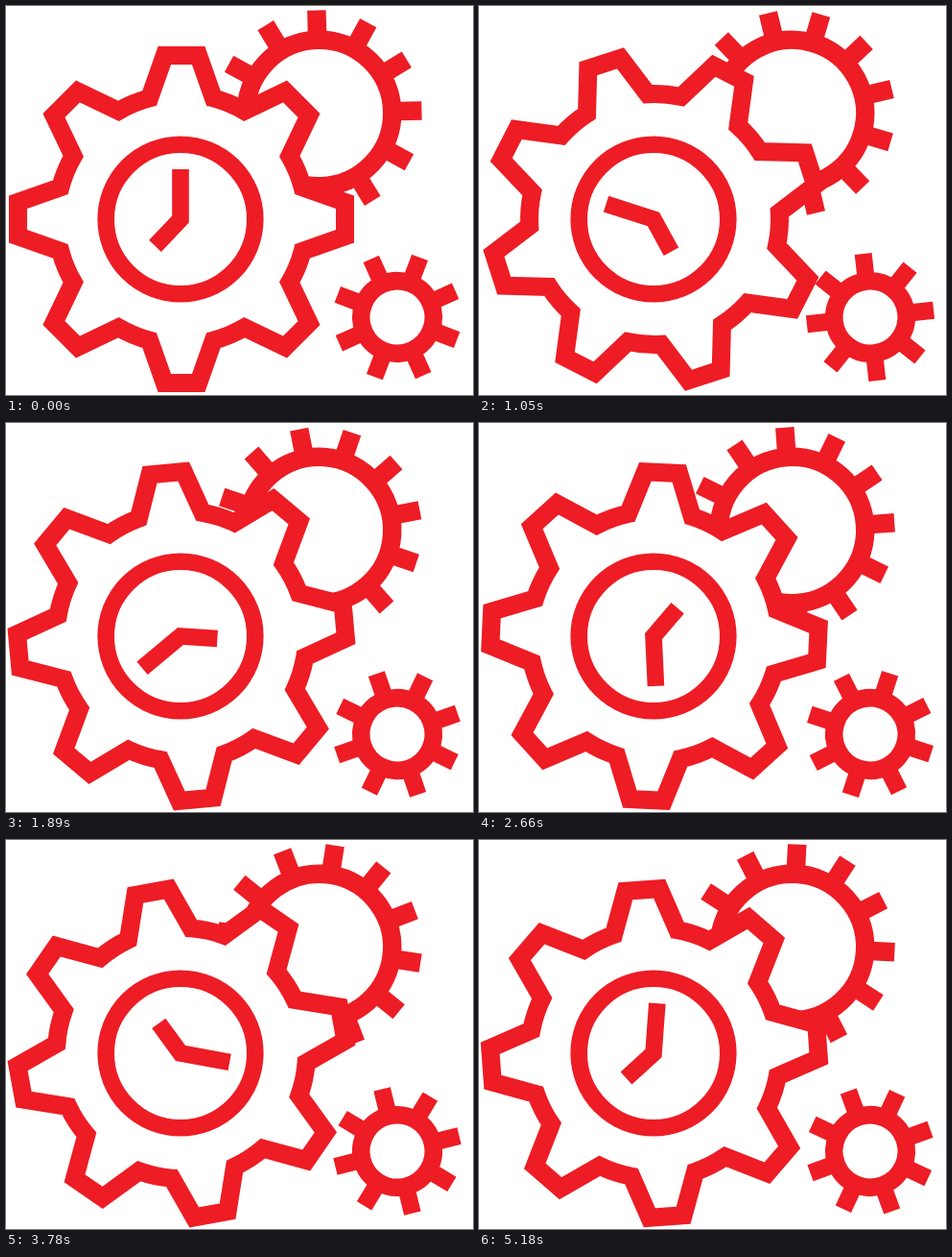
Write an HTML page that moves like this. It is 487 px wide and 405 px high and loops after 5.25 s.

```html
<!DOCTYPE html>
<html lang="en">
<head>
<meta charset="utf-8">
<title>Clockwork gears</title>
<style>
  html, body { margin: 0; width: 100%; height: 100%; overflow: hidden; background: #fff; }
  svg { display: block; width: 100%; height: 100%; }
</style>
</head>
<body>
<svg id="stage" viewBox="0 0 487 405" fill="none" stroke="#ee1c24" stroke-miterlimit="10"></svg>
<script>
// Slightly more than 360 / STEPS, so the last step of the loop is a little shorter
const STEP = 70, STEPS = 75, TURN = 4.808;
const stage = document.getElementById('stage');

function add(parent, tag, attrs) {
  const node = document.createElementNS('http://www.w3.org/2000/svg', tag);
  for (const name in attrs) node.setAttribute(name, attrs[name]);
  return parent.appendChild(node);
}

// Clockwise from twelve o'clock, in degrees
function polar(radius, angle) {
  const a = angle * Math.PI / 180;
  return [radius * Math.sin(a), -radius * Math.cos(a)].map(v => v.toFixed(2)).join(' ');
}

const spinners = [];
function spinner(x, y, direction, base = 0) {
  const node = add(stage, 'g', {});
  spinners.push({ node, x, y, direction, base });
  return node;
}

function cog(x, y, base, teeth, { inner, outer, tip, width }) {
  const group = spinner(x, y, -1, base);
  add(group, 'circle', { r: (inner + outer) / 2, 'stroke-width': outer - inner });
  let d = '';
  for (let i = 0; i < teeth; i++) {
    const angle = i * 360 / teeth;
    d += `M${polar(outer - 4, angle)}L${polar(tip, angle)}`;
  }
  add(group, 'path', { d, 'stroke-width': width });
}

function bigGear(x, y) {
  const teeth = 8, pitch = 360 / teeth;
  const tipRadius = Math.hypot(17.7, 170.5);
  const tipAngle = Math.atan2(17.7, 170.5) * 180 / Math.PI;
  const rootRadius = 130.5, rootAngle = 14.8;
  let d = '';
  for (let i = 0; i < teeth; i++) {
    const a = i * pitch;
    d += `${i ? 'L' : 'M'}${polar(tipRadius, a - tipAngle)}L${polar(tipRadius, a + tipAngle)}`
      + `L${polar(rootRadius, a + rootAngle)}`
      + `A${rootRadius} ${rootRadius} 0 0 1 ${polar(rootRadius, a + pitch - rootAngle)}`;
  }
  add(spinner(x, y, 1), 'path', { d: d + 'Z', fill: '#fff', 'stroke-width': 19 });
}

function clock(x, y) {
  add(stage, 'circle', { cx: x, cy: y, r: 77.8, 'stroke-width': 17.6 });
  add(spinner(x, y, -1), 'path', {
    d: `M${polar(52, 0)}L0 0L${polar(38.5, 223.5)}`, 'stroke-width': 17.6
  });
}

cog(326.5, 111.5, -1.4, 12, { inner: 66.5, outer: 86, tip: 107, width: 19.5 });
bigGear(183, 222);
cog(408, 324, 20.8, 8, { inner: 28.5, outer: 47, tip: 66.5, width: 18 });
clock(182, 222);

function draw(ms) {
  const step = Math.floor(ms / STEP) % STEPS;
  for (const { node, x, y, direction, base } of spinners) {
    const angle = base + direction * step * TURN;
    node.setAttribute('transform', `translate(${x} ${y}) rotate(${angle.toFixed(3)})`);
  }
}

const start = performance.now();
function tick() {
  draw(performance.now() - start);
  requestAnimationFrame(tick);
}
tick();
</script>
</body>
</html>
```
